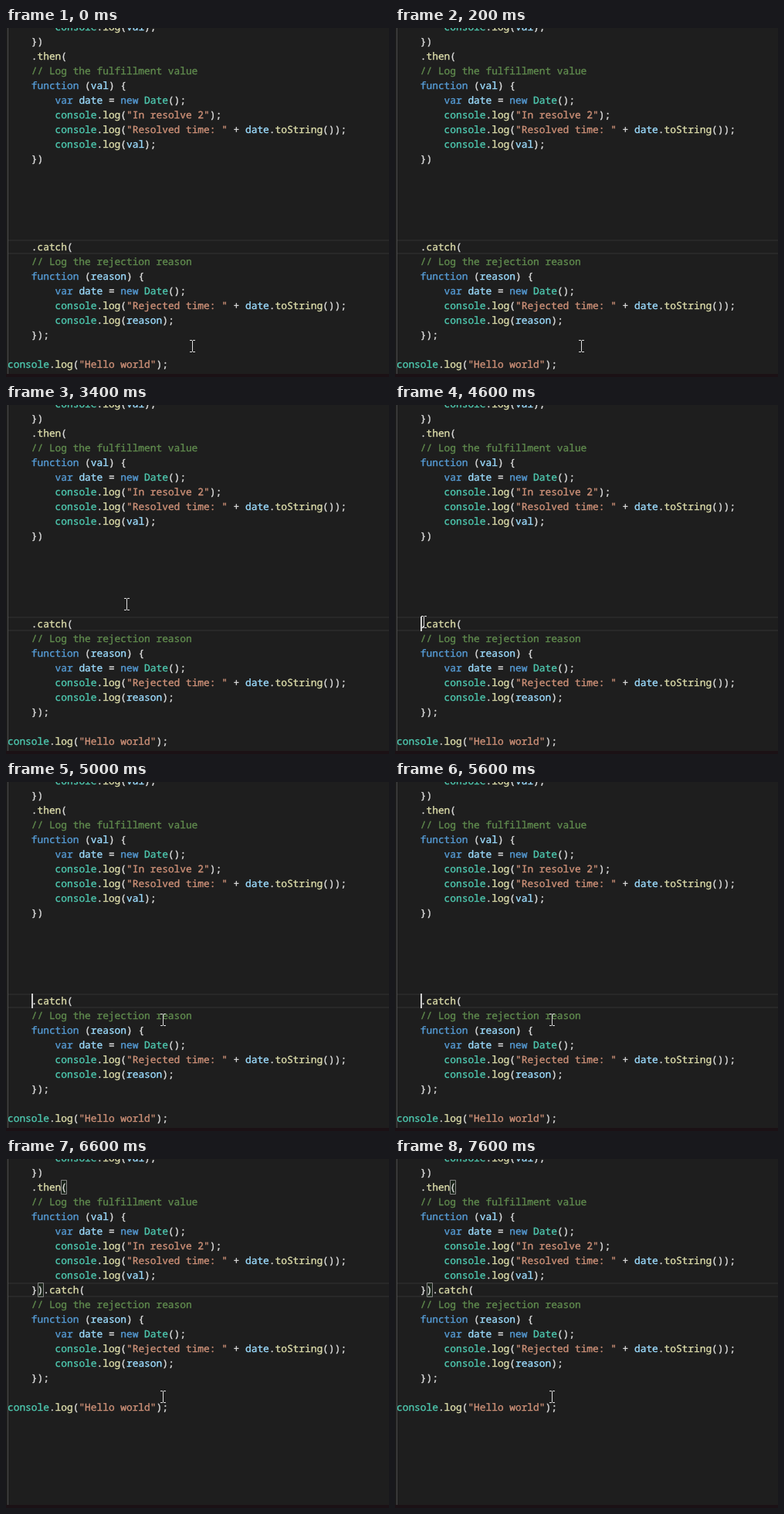
Animation, 496 px wide and 452 px high, one loop 8000 ms. Source, as an HTML page with a canvas:

```html
<!DOCTYPE html>
<html lang="en">
<head>
<meta charset="utf-8">
<title>Code editor</title>
<style>
  html, body { margin: 0; width: 100%; height: 100%; overflow: hidden; background: #1e1e1e; }
  canvas { display: block; }
</style>
</head>
<body>
<canvas id="stage" width="496" height="452"></canvas>
<script>
const ctx = document.getElementById('stage').getContext('2d');
const LOOP = 8000, STEP = 200;
const LEFT = 2, CHAR = 7.7, LINE = 19;

const upper = `        console.log(val);
    })
    .then(
    // Log the fulfillment value
    function (val) {
        var date = new Date();
        console.log("In resolve 2");
        console.log("Resolved time: " + date.toString());
        console.log(val);
    })`;
const lower = `    // Log the rejection reason
    function (reason) {
        var date = new Date();
        console.log("Rejected time: " + date.toString());
        console.log(reason);
    });

console.log("Hello world");`;
const spread = (upper + '\n'.repeat(6) + '    .catch(\n' + lower).split('\n');
const joined = (upper + '.catch(\n' + lower).split('\n');

const rules = [
  [/^\/\//, '#608b4e'],
  [/^"/, '#ce9178'],
  [/^(function|var|new)$/, '#569cd6'],
  [/^(console|Date)$/, '#4ec9b0'],
  [/^(log|then|catch|toString)$/, '#dcdcaa'],
  [/^\w/, '#9cdcfe'],
  [/./, '#dcdcdc']
];
const token = /\/\/.*|"[^"]*"|\w+|[^\w\s"]+/g;

// Pointer stops: time, x, y
const stops = [
  [0, 241, 412], [2200, 243, 412], [2400, 222, 399], [2600, 99, 318],
  [2800, 70, 296], [3000, 60, 281], [3200, 156, 257], [3400, 156, 258],
  [3800, 101, 259], [4000, 56, 294], [4200, 107, 296], [4400, 37, 281],
  [4800, 150, 300], [5000, 203, 308]
];
// The caret toggles at each of these times
const blinks = [4600, 5200, 5600, 6600, 7000, 7600];

const colX = col => LEFT + col * CHAR;
const rowY = row => row * LINE - 11;

function rect(color, x, y, w, h) {
  ctx.fillStyle = color;
  ctx.fillRect(x, y, w, h);
}

// A hairline outline gives the text its medium weight
function drawLine(text, row) {
  ctx.lineWidth = 0.35;
  for (const m of text.matchAll(token)) {
    const x = colX(m.index), y = rowY(row) + 14;
    ctx.fillStyle = ctx.strokeStyle = rules.find(r => r[0].test(m[0]))[1];
    ctx.fillText(m[0], x, y);
    ctx.strokeText(m[0], x, y);
  }
}

function drawBracket(col, row) {
  const x = Math.round(colX(col)), y = rowY(row);
  rect('rgba(0, 100, 0, 0.1)', x, y, 8, LINE);
  ctx.lineWidth = 1;
  ctx.strokeStyle = '#888';
  ctx.strokeRect(x + 0.5, y + 0.5, 7, LINE - 1);
}

function drawPointer(x, y) {
  const c = '#dedede';
  for (const end of [y - 8, y + 7]) {
    rect(c, x - 3, end, 3, 1);
    rect(c, x + 1, end, 3, 1);
  }
  rect(c, x, y - 7, 1, 14);
}

function draw(now) {
  const t = Math.floor(now % LOOP / STEP) * STEP;
  const isJoined = t >= 6000;
  const row = isJoined ? 9 : 15;
  const y = rowY(row);

  rect('#1e1e1e', 0, 0, 496, 452);
  rect('#4c4c4c', 2, 0, 1, 448);
  rect('#1b1115', 0, 448, 496, 4);
  rect('#282828', 3, y, 493, 2);
  rect('#282828', 3, y + 17, 493, 2);

  if (isJoined) {
    drawBracket(9, 2);
    drawBracket(5, 9);
  }

  ctx.font = CHAR / 0.6 + 'px "Noto Sans Mono", "DejaVu Sans Mono", monospace';
  ctx.textRendering = 'geometricPrecision';
  ctx.lineJoin = 'round';
  (isJoined ? joined : spread).forEach(drawLine);

  if (blinks.filter(b => b <= t).length % 2) {
    rect('#d0d0d0', Math.round(colX(isJoined ? 6 : 4)), y, 2, LINE);
  }
  const [, px, py] = stops.findLast(s => s[0] <= t);
  drawPointer(px, py);
}

const start = performance.now();
function tick() {
  draw(performance.now() - start);
  requestAnimationFrame(tick);
}
tick();
</script>
</body>
</html>
```
